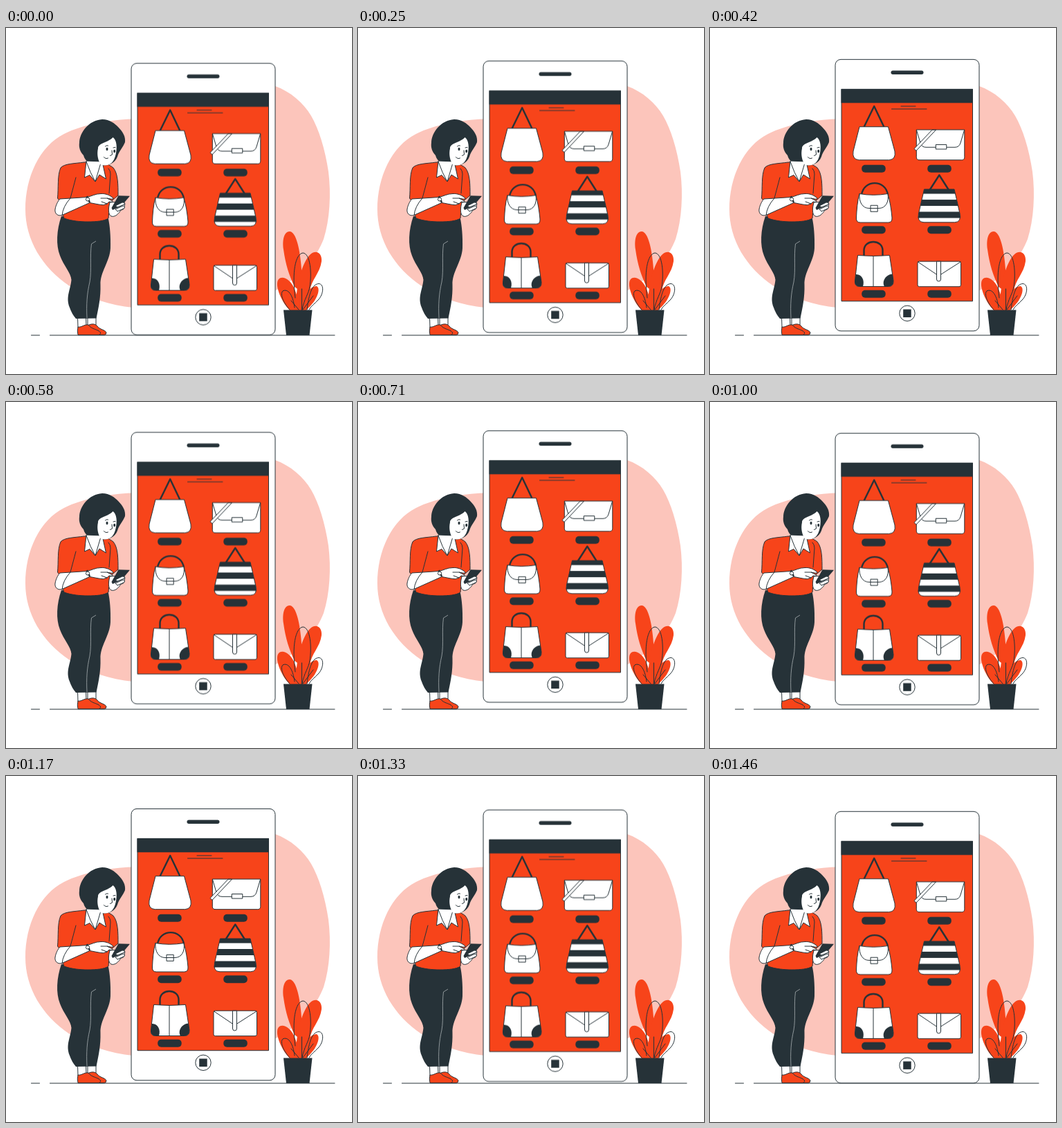
Recreate the animation shown at these times as an HTML page without scripts. Size 500 px wide and 500 px high, loop 1.5 s.

```html
<!DOCTYPE html>
<html lang="en">
<head>
<meta charset="utf-8">
<title>Bag shop</title>
<style>
  html, body { margin: 0; width: 100%; height: 100%; overflow: hidden; background: #fff; }
  svg { display: block; width: 100%; height: 100%; --ink: #263238; --red: #f7441a; }
  .line { fill: none; stroke: var(--ink); stroke-width: 1; stroke-linecap: round; stroke-linejoin: round; }
  .white { fill: #fff; stroke: var(--ink); stroke-width: 1; stroke-linejoin: round; }
  .red { fill: var(--red); stroke: var(--ink); stroke-width: 1; stroke-linejoin: round; }
  .leaf { fill: var(--red); }
  .ink { fill: var(--ink); }
  .handle { fill: none; stroke: var(--ink); stroke-width: 2.4; stroke-linejoin: round; }
  /* 24 steps per second; the phone rises 10px and comes back */
  .phone { animation: bob 1.5s steps(18) infinite; }
  @keyframes bob {
    0% { transform: translateY(-.39px); }
    49.99% { transform: translateY(-10.39px); }
    50% { transform: translateY(-9.61px); }
    100% { transform: translateY(.39px); }
  }
</style>
</head>
<body>
<svg viewBox="0 0 500 500">
  <defs>
    <rect id="pill" class="ink" width="34.500" height="11" rx="5"/>
  </defs>

  <path fill="#fcc5bb" d="M182 131.500C150 133 112 139 84 153C48 171 28 216 28 262C28 306 52 346 92 373C118 390 150 401 184 404C270 408 350 400 398 375C430 354 449 331 459 305C468 277 470 240 466 208C461 174 452 146 441 127C430 108 411 92 389 84C310 76 240 128 182 131.500Z"/>
  <path class="line" d="M36.500 444H48.500M63.500 444H475"/>

  <g id="plant">
    <path class="leaf" d="M410 294C402 294 399 306 401 320C404 342 409 357 417 374L428 382C429 350 424 295 410 294Z"/>
    <path class="leaf" d="M420 408C417 375 428 338 440 327C448 320 457 325 456 337C454 354 441 364 439 380L432 408Z"/>
    <path class="leaf" d="M425 408C427 389 437 375 448 373C454 374 452 385 446 394C441 401 437 404 434 408Z"/>
    <path class="leaf" d="M410 408C396 393 388 370 394 363C399 357 411 363 416 375C421 387 425 399 426 408Z"/>
    <path class="line" d="M418 390C413 353 418 327 429 325C440 326 442 354 439 374C437 385 431 391 428 407"/>
    <path class="line" d="M435 407C438 382 443 370 452 369.500C460 370 459 384 452 392C446 399 441 401 438 407"/>
    <path class="line" d="M410 407C400 397 395 382 401 379.500C409 377 415 388 417 404"/>
    <path class="line" d="M427.500 377V408M412 394L423 407M444 387L429 407"/>
    <path class="ink" d="M401 407.500H442.500L438.500 444H405Z"/>
  </g>

  <g class="phone">
    <rect class="white" x="181" y="51.400" width="208" height="392.400" rx="8"/>
    <rect class="ink" x="261.500" y="67.500" width="47" height="5.500" rx="2.700"/>
    <rect class="red" x="190" y="94.400" width="189.500" height="306.300"/>
    <path class="ink" d="M189.500 94H380V114.300H189.500Z"/>
    <path class="line" d="M276 119H297M262.500 123H313"/>
    <circle class="white" cx="285" cy="418.300" r="11.200"/>
    <path class="ink" d="M279.200 412.500h11.500v11.500h-11.500z"/>

    <use href="#pill" x="219.200" y="203.800"/>
    <use href="#pill" x="314.300" y="203.800"/>
    <use href="#pill" x="219.200" y="292.300"/>
    <use href="#pill" x="314.300" y="292.300"/>
    <use href="#pill" x="219.200" y="384.800"/>
    <use href="#pill" x="314.300" y="384.800"/>

    <g id="tote">
      <path class="handle" d="M222.500 149L237.200 119L251.500 149"/>
      <path class="white" d="M216 148.700H257.500L267 184Q269 196 258.500 196.700H215.500Q205 196 207 184Z"/>
    </g>
    <g id="satchel">
      <path class="white" d="M298.300 153H367.800V192.500Q367.800 196.700 363.500 196.700H303Q298.300 196.700 298.300 192.500Z"/>
      <path class="line" d="M298.500 153.500L304 172Q306 178.300 312 178.300H354Q360 178.300 362 172L367.500 153.500"/>
      <rect class="white" x="326.300" y="174.500" width="15.500" height="6.500"/>
      <path class="white" d="M321 153.200H326.500L298 183.300L295 180.500Z"/>
    </g>
    <g id="flap-bag">
      <path class="handle" d="M219 247C222 224.500 254 224.500 257 247"/>
      <path class="white" d="M216 245.500Q236 249 257 245.500C260 256 262 268 263 280Q263.500 287 257.500 287H217Q211 287 211.500 280C212 268 213 256 216 245.500Z"/>
      <path class="line" d="M216 245.500C215 257 220 266.500 230 266.500H244C254 266.500 259 257 257 245.500"/>
      <path class="white" d="M232 262.300h10.200v9H232zM232 266.500h10.200"/>
    </g>
    <g id="striped-bag">
      <path class="handle" d="M317.500 240L331.300 218.500L345 240"/>
      <path class="white" d="M309.500 239H353L361 274Q363.500 286.500 353.500 286.800H309Q299 286.500 301.500 274Z"/>
      <path class="ink" d="M309.500 239H353L354.500 245.500H308ZM306 254H356.500L358.500 263H304ZM302 271.500H360.500L362 280.500H300.700Z"/>
    </g>
    <g id="capped-bag">
      <path class="handle" d="M222.500 335V327C223 311 249 311 249.500 327V335"/>
      <path class="white" d="M213.500 334.500Q236 336.500 259.500 334.500L265 371Q265.500 379 258.500 379.500H215.500Q208.500 379 209.500 371Z"/>
      <path class="line" d="M236 335.500V379.500"/>
      <path class="ink" d="M210.500 362C219 361 224 370 221 379.500H215.500Q208.500 379 209.500 371ZM263.700 361.500C254 362 248 372 252 379.500H258.500Q265.500 379 265 371Z"/>
    </g>
    <g id="envelope-bag">
      <rect class="white" x="300" y="343.200" width="62.500" height="36.500" rx="2.500"/>
      <path class="line" d="M300.500 344L328 362.500M362 344L333 362.500"/>
      <path class="white" d="M327.500 343.200H333.500V369Q333.500 372 330.500 372T327.500 369Z"/>
    </g>
  </g>

  <g id="woman">
    <path class="white" d="M103.500 417L104 433H116L115.500 417ZM118 417V433H130V417Z"/>
    <path class="red" d="M118 430C123 427 129 427 132 431C136 436 143 436 145 440Q145 443.500 142 443.500H118Z"/>
    <path class="red" d="M104 432C109 433 113 428 119 429C124 436 133 435 136.500 440Q137 443.500 133 443.500H104Q102.500 438 104 432Z"/>
    <path class="ink" d="M80 272C73 292 72 314 78 329C83 343 94 354 94.500 364C93 379 86 389 92 404Q95 413 101 420L130.500 419.500C134 403 137 389 136.500 371C136 352 150 338 151 318C151.500 300 150 286 148 276Z"/>
    <path fill="none" stroke="#a9b0b3" stroke-width=".8" d="M130 308L123.500 312C121 330 124 350 121 367C117 384 116 400 117 419"/>

    <path class="red" d="M113 194C98 196 84 196 79 202C74 213 76 231 74.500 246C79 252 84 257 83 267Q82 272 84 275C95 279 108 280 118 280C131 280 142 279 148 275C149 264 149 260 150 252L162 242C162 227 162 210 155 202C150 198 143 195 140 194Z"/>
    <path class="line" d="M101 216L93 246M148 203Q151 206 151 211L149 239"/>
    <path class="ink" d="M139 132C150 132 157 138 162 143C169 150 173 157 172 165C169 173 163 178 161 186C157 196 148 199 138 199C124 199 114 193 112 184C107 179 105 172 106 166C106 151 120 133 139 132Z"/>
    <path class="white" d="M116 192L113.500 216L121 212.500L129 222L135 212L144.500 218L139 193Z"/>
    <path class="line" d="M116 193Q122 210 129 222L137 195"/>
    <path fill="#fff" d="M133 174C133 166 147 166 154.500 158C160 162 161 172 158.500 183C156 194 151 198 143 198.500L137 198C133 191 131 183 133 174Z"/>
    <path class="line" d="M153 177L153.500 183L150.500 184.500M141.500 186.500Q144 190 147.500 188M143.500 171Q145 169 147.500 170M155 173L158 172.500"/>
    <ellipse class="ink" cx="146" cy="175" rx="1.500" ry="2.200"/>
    <ellipse class="ink" cx="156.700" cy="178" rx="1.500" ry="2.200"/>

    <path class="white" d="M150 252C148 260 147 269 152 272C158 274 164 267 166 263C170 263 172 260 171 257C173 254 171 250 168 251Z"/>
    <path class="ink" d="M162.500 242.300L179 242.800L167 257L154 263L152.500 260Z"/>
    <path class="white" d="M158 257L168 252Q172 252 171 255L161 259ZM158 262L169 257Q173 258 170 261L161 265Z"/>
    <path class="white" d="M78 247L94 246L117 244.500C124 243 129 239.500 137 239.500C143 239 150 241 155 246Q155 248 151 247L146 246L154 250Q154 252 149 251L146 254Q141 257 134 255L121 252.500L82 270C75 273 70 268 71 262C72 256 75 250 78 247Z"/>
    <path class="line" d="M93 246Q82 258 81 271M137 246L146 246M138 251L146 254"/>
    <path class="handle" d="M117 243L121 252"/>
    <circle class="white" cx="118" cy="247.500" r="2.600"/>
  </g>
</svg>
</body>
</html>
```
